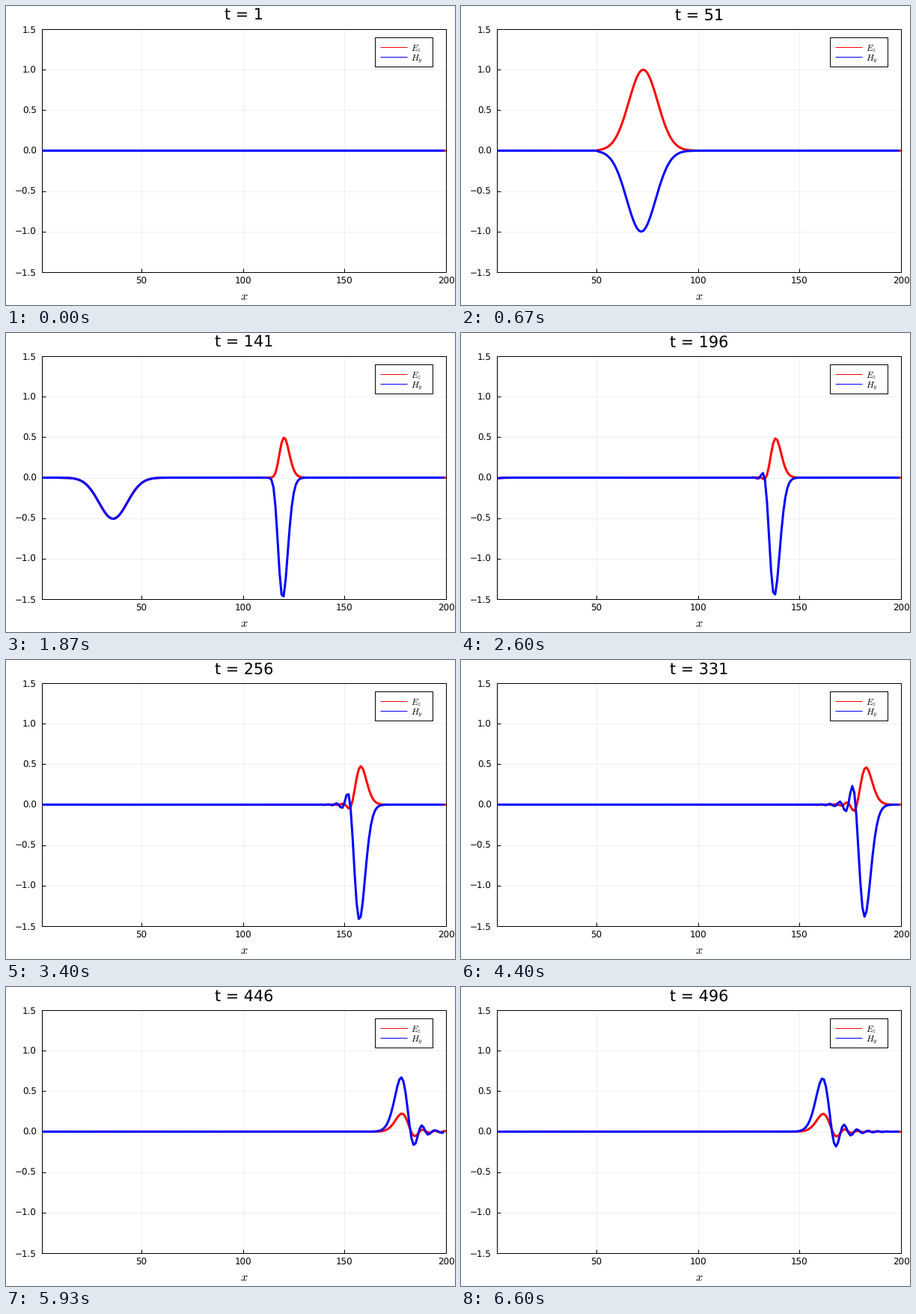
These frames come from a looping animation (600x400 px, 6.67 s). A matplotlib script:

```python
import numpy as np
import matplotlib.pyplot as plt
from matplotlib.animation import FuncAnimation
from matplotlib.lines import Line2D
from matplotlib.patches import Rectangle
from matplotlib.transforms import Affine2D

plt.rcParams.update({
    "font.family": "DejaVu Sans",
    "mathtext.fontset": "cm",
    "text.hinting": "no_hinting",
})

W, H, DPI = 600, 400, 100
PX = 72 / DPI                      # one pixel in points
LEFT, RIGHT, TOP, BOTTOM = 48.2, 588, 31, 356
MID = (LEFT + RIGHT) / 2
CELLS, SRC, SLAB = 200, 50, 99
STEPS, STRIDE = 100, 5
LOOP, SUB = 6670, 3                # loop in ms, ticks per step


def simulate():
    """1D FDTD pulse hitting a dielectric half-space; H is scaled by impedance."""
    ez, hy = np.zeros(CELLS), np.zeros(CELLS - 1)
    eps = np.where(np.arange(CELLS) >= SLAB, 9.0, 1.0)

    def pulse(t):
        return np.exp(-(t - 30) ** 2 / 100)

    states = []
    for t in range(1, STEPS * STRIDE + 1):
        hy += np.diff(ez)
        hy[SRC - 1] -= pulse(t)
        ez[0], ez[-1] = ez[1], ez[-2]
        ez[1:-1] += np.diff(hy) / eps[1:-1]
        ez[SRC] += pulse(t + 1)
        if t % STRIDE == 1:
            states.append((t, ez.copy(), hy.copy()))
    return states


fig = plt.figure(figsize=(W / DPI, H / DPI), dpi=DPI, facecolor="white")
ax = fig.add_axes([LEFT / W, 1 - BOTTOM / H, (RIGHT - LEFT) / W, (BOTTOM - TOP) / H])
ax.set(xlim=(1, CELLS), ylim=(-1.5, 1.5))
to_px = Affine2D().scale(1 / W, -1 / H).translate(0, 1) + fig.transFigure


def label(x, y, s, size, ha="center"):
    return fig.text(x / W, 1 - y / H, s, fontsize=size * PX, ha=ha, va="baseline")


def add_px(artist):
    artist.set_transform(to_px)
    fig.add_artist(artist)


xticks = np.arange(50, 201, 50)
yticks = np.arange(-1.5, 1.6, 0.5)
ax.set_xticks(xticks, labels=[])
ax.set_yticks(yticks, labels=[])
ax.tick_params(direction="in", length=5 * PX, width=PX)
ax.grid(color="black", alpha=0.06, linewidth=PX)
ax.set_axisbelow(True)
for spine in ax.spines.values():
    spine.set(linewidth=PX, zorder=1.5)

for v in xticks:
    label(LEFT + (v - 1) / (CELLS - 1) * (RIGHT - LEFT), 372, str(v), 11.9)
for v in yticks:
    y = BOTTOM - (v + 1.5) / 3 * (BOTTOM - TOP)
    label(41, y + 4.4, f"{v:.1f}".replace("-", "\u2212"), 11.9, "right")
label(MID, 392.6, "$x$", 16.3)
title = label(MID, 18.5, "", 20.8)

style = dict(linewidth=3 * PX, solid_capstyle="butt", solid_joinstyle="round")
e_line, = ax.plot([], [], color="red", zorder=3, **style)
h_line, = ax.plot([], [], color="blue", zorder=4, **style)

# Legend, laid out in pixels from the top left corner
add_px(Rectangle((493, 42), 77, 39, facecolor="white", edgecolor="black", linewidth=PX))
for y, color, name in ((55, "red", "$E_z$"), (68, "blue", "$H_y$")):
    add_px(Line2D([500, 536], [y, y], color=color, linewidth=PX, solid_capstyle="butt"))
    label(540.6, y + 4.6, name, 11.9, "left")

states = simulate()
cells = np.arange(1, CELLS + 1)


def draw(i):
    t, ez, hy = states[min((i + 1) // SUB, STEPS - 1)]
    e_line.set_data(cells, ez)
    h_line.set_data(cells[:-1], hy)
    title.set_text(f"t = {t}")
    return e_line, h_line, title


ticks = STEPS * SUB
anim = FuncAnimation(fig, draw, frames=ticks, interval=LOOP / ticks, repeat=True, repeat_delay=0)
plt.show()
```
